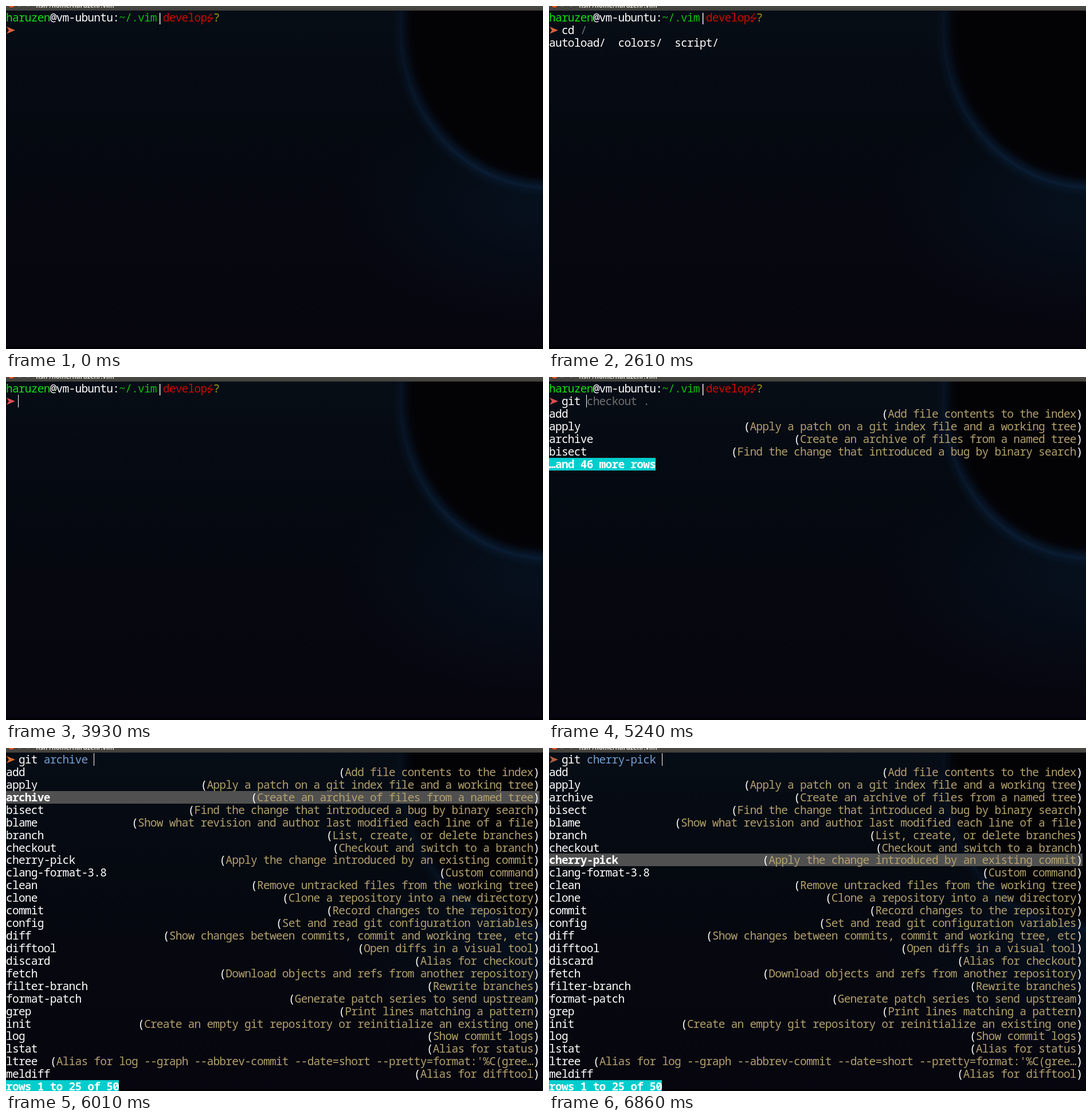
An HTML page for the animation above (7.09 s loop, 937 px wide and 598 px high).

```html
<!DOCTYPE html>
<html lang="en">
<head>
<meta charset="utf-8">
<title>fish completion</title>
<style>
  html, body { margin: 0; width: 100%; height: 100%; overflow: hidden; background: #04060e; }
  #stage {
    position: relative; width: 937px; height: 598px; overflow: hidden;
    background:
      radial-gradient(258px 278px at 945px 40px, #030306 0 90%, #04060c 95%, transparent 100%),
      radial-gradient(340px 200px at 920px 350px, rgba(6, 20, 34, .7), transparent),
      linear-gradient(#070d16, #050910 35%, #06070f 65%, #07060f);
  }
  #glow {
    position: absolute; inset: 0;
    background: radial-gradient(258px 278px at 945px 40px, transparent 93%, #071425 97.5%,
      #0a1c33 99.5%, rgba(8, 24, 43, .7) 101%, transparent 106%);
    -webkit-mask-image: linear-gradient(165deg, rgba(0, 0, 0, .4) 20%, #000 55%);
    mask-image: linear-gradient(165deg, rgba(0, 0, 0, .4) 20%, #000 55%);
  }
  #glow.faint { opacity: .5; }
  #foot { position: absolute; inset: 594px 0 0; background: #020207; }
  #bar {
    position: absolute; inset: 0 0 auto; height: 8px; overflow: hidden;
    background: linear-gradient(#4b4a45, #403f3a);
    font: bold 11px/14px "Noto Sans", sans-serif; color: #dfdbd2;
  }
  #bar b { position: absolute; left: 52px; top: -8px; white-space: pre; }
  #bar i {
    position: absolute; top: -8px; width: 11px; height: 11px; border-radius: 50%;
    background: #55544f; box-shadow: 0 0 0 1px #33322e;
  }
  #bar i:first-child { background: #e2552c; }
  #screen {
    color: #fff; font: 19.5px/21px "Noto Sans Mono", monospace;
    letter-spacing: calc(10.95px - .6em);
  }
  .row { position: absolute; left: 0; width: 931px; height: 21.93px; white-space: pre; }
  .row span { display: inline-block; height: 21.93px; vertical-align: top; }
  .row svg { position: absolute; left: 0; top: 0; overflow: visible; }
  .sel { background: #505050; }
  .name.sel, .sel .name, .status { font-weight: bold; }
  .status { background: #00cdcd; }
  .user { color: #10e010; }
  .path { color: #0fbe0f; }
  .branch { color: #cc0a05; }
  .mark { color: #a09a10; }
  .arg { color: #729fcf; }
  .hint { color: #707070; }
  .desc { color: #b3a06d; }
  .row .cursor { position: absolute; top: 0; width: 1px; background: #fff; }
</style>
</head>
<body>
<div id="stage">
  <div id="glow"></div>
  <div id="foot"></div>
  <div id="screen"></div>
  <div id="bar">
    <i style="left:4px"></i><i style="left:18px"></i><i style="left:33px"></i>
    <b>fish /home/haruzen/.vim</b>
  </div>
</div>
<script>
const LOOP = 7090, CELL = 10.95, LINE = 21.93, TOP = 9, COLS = 85;
const screenEl = document.getElementById('screen');
const glowEl = document.getElementById('glow');

const dirs = ['autoload/', 'colors/', 'script/'];
const commands = `add|Add file contents to the index
apply|Apply a patch on a git index file and a working tree
archive|Create an archive of files from a named tree
bisect|Find the change that introduced a bug by binary search
blame|Show what revision and author last modified each line of a file
branch|List, create, or delete branches
checkout|Checkout and switch to a branch
cherry-pick|Apply the change introduced by an existing commit
clang-format-3.8|Custom command
clean|Remove untracked files from the working tree
clone|Clone a repository into a new directory
commit|Record changes to the repository
config|Set and read git configuration variables
diff|Show changes between commits, commit and working tree, etc
difftool|Open diffs in a visual tool
discard|Alias for checkout
fetch|Download objects and refs from another repository
filter-branch|Rewrite branches
format-patch|Generate patch series to send upstream
grep|Print lines matching a pattern
init|Create an empty git repository or reinitialize an existing one
log|Show commit logs
lstat|Alias for status
ltree|Alias for log --graph --abbrev-commit --date=short --pretty=format:'%C(gree…
meldiff|Alias for difftool`.split('\n').map(line => line.split('|'));

// Each step: start time and what the shell shows from then on.
const steps = [];
const at = (time, state) => steps.push({
  time, cmd: '', arg: '', hint: '', cursor: true, list: '', sel: -1, arrow: '#d9603f', ...state
});
const pickDir = (time, sel) => at(time, { cmd: 'cd ', arg: dirs[sel], list: 'dirs', sel });
const pickCommand = (time, sel, arrow = '#d06c30') =>
  at(time, { cmd: 'git ', arg: commands[sel][0] + ' ', list: 'full', sel, arrow });

at(0, { cursor: false });
at(290, {});
at(840, { cursor: false });
at(1450, {});
at(1530, { cmd: 'c', hint: 'd /' });
at(1600, { cmd: 'cd', hint: ' /' });
at(1680, { cmd: 'cd ', hint: '/' });
at(2080, { cmd: 'cd ', hint: '/', list: 'dirs' });
at(2610, { cmd: 'cd ', hint: '/', list: 'dirs', cursor: false });
[2690, 2840, 3090, 3320, 3470].forEach((time, i) => pickDir(time, i % 3));
const red = '#dc4c52';
at(3930, { arrow: red });
at(4460, { cmd: 'gi', hint: 't checkout .', arrow: red });
at(4540, { cmd: 'git', hint: ' checkout .', arrow: red });
at(4690, { cmd: 'git ', hint: 'checkout .', arrow: red });
at(5240, { cmd: 'git ', hint: 'checkout .', list: 'short', arrow: red });
at(5470, { cmd: 'git ', hint: 'checkout .', list: 'full', arrow: '#dc6a2c' });
[5550, 5780, 6010, 6160, 6330, 6560, 6710].forEach((time, i) => pickCommand(time, i));
pickCommand(6860, 7, '#b25f42');

function span(text, cls = '') {
  const el = document.createElement('span');
  el.className = cls;
  el.textContent = text;
  return el;
}

function shape(attrs) {
  const ns = 'http://www.w3.org/2000/svg';
  const svg = document.createElementNS(ns, 'svg');
  const path = document.createElementNS(ns, 'path');
  svg.setAttribute('width', 1);
  svg.setAttribute('height', 1);
  for (const key in attrs) path.setAttribute(key, attrs[key]);
  svg.append(path);
  return svg;
}

function row(index, parts, cls = '') {
  const el = document.createElement('div');
  el.className = 'row ' + cls;
  el.style.top = TOP + index * LINE + 'px';
  el.append(...parts);
  return el;
}

function header() {
  const bolt = shape({
    d: 'M359 4L352 12H361L353 18M353 14.5V18H356.5',
    fill: 'none', stroke: '#cc0a05', 'stroke-width': 1.3
  });
  return row(0, [
    span('haruzen', 'user'), span('@vm-ubuntu:'), span('~/.vim', 'path'), span('|'),
    span('develop', 'branch'), span(' '), span('?', 'mark'), bolt
  ]);
}

function prompt(index, s) {
  const parts = [
    shape({ d: 'M1 5L16 11.2L1 17.4L5 11.2Z', fill: s.arrow }),
    span('  ' + s.cmd), span(s.arg, 'arg'), span(s.hint, 'hint')
  ];
  if (s.cursor) {
    const cursor = span('', 'cursor');
    cursor.style.left = Math.floor((2 + s.cmd.length + s.arg.length) * CELL) + 'px';
    parts.push(cursor);
  }
  return row(index, parts);
}

function commandRow([name, desc], index, selected) {
  const gap = ' '.repeat(COLS - name.length - desc.length - 2);
  return row(index, [span(name, 'name'), span(gap + '('), span(desc, 'desc'), span(')')],
    selected ? 'sel' : '');
}

function render(s) {
  const full = s.list === 'full';
  const first = full ? 1 : 2;
  const rows = full ? [] : [header()];
  rows.push(prompt(first - 1, s));
  if (s.list === 'dirs') {
    rows.push(row(2, dirs.flatMap((dir, i) =>
      [span(dir, i === s.sel ? 'name sel' : 'name'), span('  ')])));
  } else if (s.list) {
    const shown = commands.slice(0, full ? 25 : 4);
    const status = full ? 'rows 1 to 25 of 50' : '…and 46 more rows';
    rows.push(...shown.map((c, i) => commandRow(c, first + i, i === s.sel)));
    rows.push(row(first + shown.length, [span(status, 'status')]));
  }
  screenEl.replaceChildren(...rows);
  glowEl.classList.toggle('faint', full);
}

let current;
function tick() {
  const t = performance.now() % LOOP;
  const step = steps.findLast(s => s.time <= t);
  if (step !== current) render(current = step);
  requestAnimationFrame(tick);
}
tick();
</script>
</body>
</html>
```
